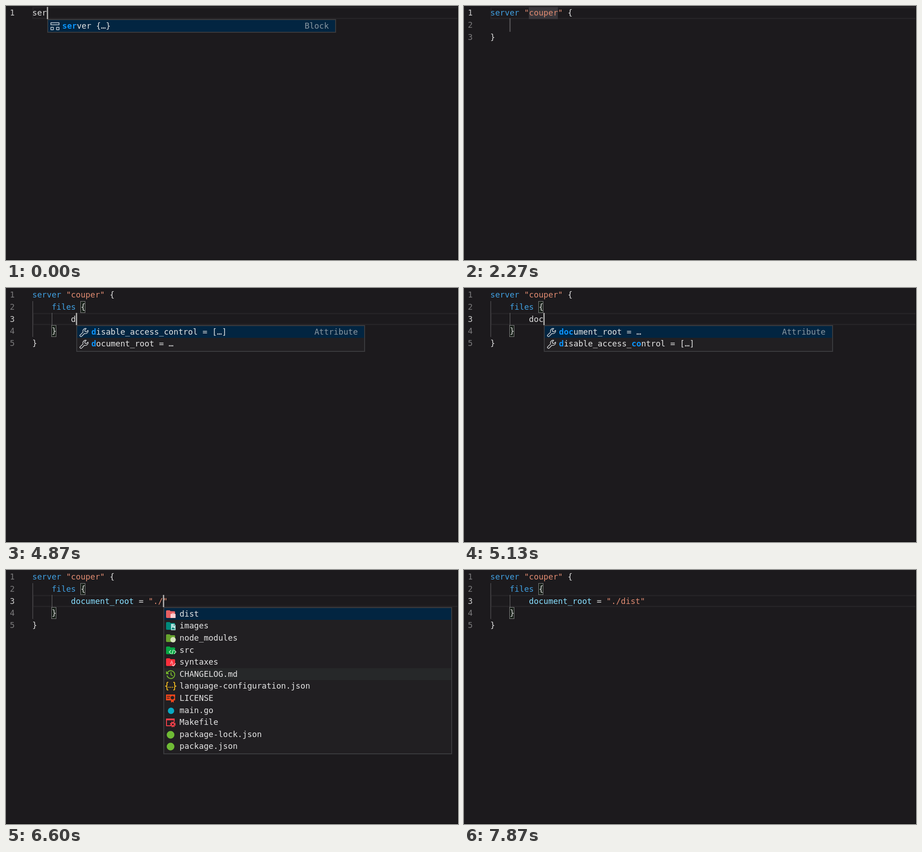
An HTML page for the animation above (8 s loop, 997x561 px).

```html
<!DOCTYPE html>
<html lang="en">
<head>
<meta charset="utf-8">
<title>Editor completion</title>
<style>
  html, body { margin: 0; width: 100%; height: 100%; overflow: hidden; background: #1c1a1d; }
  #stage {
    position: relative; width: 997px; height: 561px; overflow: hidden;
    box-sizing: border-box; border: solid #0a090b; border-width: 0 1px 1px 0;
    font: 17.73px/26.6px "DejaVu Sans Mono", monospace; color: #dedede;
  }
  #stage div, #stage svg { position: absolute; box-sizing: border-box; }
  .text { white-space: pre; }
  .num { color: #7c7b7d; }
  .num.on { color: #cbcbcb; }
  .line { border: 3px solid #252326; border-right: 0; }
  .key { color: #409fe0; }
  .str { color: #e08b71; }
  .attr { color: #88dfff; }
  .brace { border: 1.5px solid #858585; background: rgba(0, 100, 0, .1); }
  .guide { background: #403e41; }
  .guide.on { background: #706f71; }
  .hold { background: #39363a; }
  .stop { background: #4b494c; }
  #cursor { width: 3px; height: 26.6px; background: #a6a6a5; }
  #stage .pop { width: 637.5px; border: 2px solid #3b3b3e; background: #211f22; padding-bottom: 2px; color: #e4e4e4; }
  #stage .row { position: relative; height: 26.6px; padding-left: 31.5px; white-space: pre; }
  #stage .files .row { padding-left: 34px; }
  .row:first-child { background: #022541; }
  .row:only-child { height: 28.6px; margin-bottom: -2px; }
  .files .row:nth-child(6) { background: #262829; }
  .row svg { left: 4px; top: 4px; width: 22px; height: 20px; overflow: visible; }
  .row b { color: #0b93fa; }
  .detail { right: 14px; top: 0; color: #8996a0; }
</style>
</head>
<body>
<div id="stage"><div id="view"></div><div id="cursor"></div></div>
<script>
const LOOP = 8000, BLINK = 535;
const LEFT = 58, TOP = 2, CW = 10.674, LH = 26.6;
const TEXT_DY = .35; // text sits slightly below the line box
const x = col => LEFT + col * CW;
const y = line => TOP + line * LH;

// Icons, drawn in a 22 x 20 box
const line = (d, color, w = 1.5) =>
  `<path d="${d}" fill="none" stroke="${color}" stroke-width="${w}" stroke-linejoin="round"/>`;
const fill = (d, color) => `<path d="${d}" fill="${color}"/>`;
const dot = (cx, cy, r, color) => `<circle cx="${cx}" cy="${cy}" r="${r}" fill="${color}"/>`;
const label = (lx, ly, size, color, text) =>
  `<text x="${lx}" y="${ly}" fill="${color}" style='font:${size}px "Open Sans", sans-serif'>${text}</text>`;
const folder = (color, badge) =>
  fill('M0 3q0-2 2-2h6l2 2h8q2 0 2 2v11q0 2-2 2h-16q-2 0-2-2z', color) + badge;

const icons = {
  block: line('M2 2h18v4.5h-18zM2 12h5.5v5.5h-5.5zM14.5 12h5.5v5.5h-5.5z', '#cfd8df'),
  wrench: line('M20 5.5l-3.6 3.3-3-.8-.7-3 3.3-3.5a6 6 0 0 0-7 8l-6.2 6a2 2 0 0 0 3 3.2l6.3-6.3a6 6 0 0 0 7.9-6.9z', '#d0d3d6'),
  word: label(0, 14, 13.3, '#e4e4e4', 'abc'),
  dist: folder('#e45f62', fill('M10 9h3v-2h5v2h3v9h-11z', '#ffcdd2') + fill('M14 8h3v1h-3z', '#e45f62')),
  images: folder('#00897b', fill('M11 5h7l3 3v11h-10z', '#b2dfdb') + fill('M12 17l3-5 2 3 1-1 2 3zM17 6v3h3z', '#00796b')),
  modules: folder('#67a32e', dot(15.5, 13, 6, '#d5e3bd')),
  src: folder('#08a644', line('M11 9l-4 4 4 4M18 9l4 4-4 4M16 8l-3 10', '#c4f7d2')),
  syntaxes: folder('#f92f3c', label(9, 14, 11, '#ffd0d2', 'A') + line('M13 15l3 3 5-6', '#ffd0d2')),
  history: line('M3 6a8.6 8.6 0 1 1-.8 6M11 5v5.5l4 2.5', '#76b52b', 2) + fill('M0 2v7h7z', '#76b52b'),
  json: line('M5 1h-1q-2 0-2 2v4q0 2.5-3 2.5 3 0 3 2.5v4q0 2 2 2h1M16 1h1q2 0 2 2v4q0 2.5 3 2.5-3 0-3 2.5v4q0 2-2 2h-1', '#e9b41f', 2) +
    [6.5, 10.5, 14.5].map(c => dot(c, 12, 1.2, '#e9b41f')).join(''),
  license: fill('M0 1h20v13h-3v5l-3-2-3 2v-5h-11z', '#f4471c') + line('M2 5h7M2 9h6', '#211f22') +
    fill('M14 3l1.2 2 2.3-.5-.4 2.3 2 1.2-2 1.2.4 2.3-2.3-.5-1.2 2-1.2-2-2.3.5.4-2.3-2-1.2 2-1.2-.4-2.3 2.3.5z', '#211f22'),
  go: dot(11, 10, 7, '#0aa9c2'),
  make: line('M10 17h-9v-15h17v6', '#f4404a', 2) + fill('M0 1h19v4h-19z', '#f4404a') +
    `<circle cx="15" cy="14" r="5" fill="none" stroke="#f4404a" stroke-width="2.5" stroke-dasharray="2.6 1.3"/>` +
    `<circle cx="15" cy="14" r="3.3" fill="none" stroke="#f4404a" stroke-width="2.5"/>`,
  node: dot(10, 10, 8.5, '#6fbb35')
};

// Completion lists: [icon, label], with *matched* letters
const list = (rows, detail = '', kind = '') => ({ rows, detail, kind });
const attrs = (...names) => list(names.map(n => ['wrench', n]), 'Attribute');
const block = name => list([['block', name]], 'Block');
const words = list(['couper', 'document_root', 'files', 'server'].map(w => ['word', w]));
const files = list([
  ['dist', 'dist'], ['images', 'images'], ['modules', 'node_modules'], ['src', 'src'],
  ['syntaxes', 'syntaxes'], ['history', 'CHANGELOG.md'], ['json', 'language-configuration.json'],
  ['license', 'LICENSE'], ['go', 'main.go'], ['make', 'Makefile'],
  ['node', 'package-lock.json'], ['node', 'package.json']
], '', 'files');

const outer = (name, body = '') => `server "${name}" {\n${body}\n}`;
const inner = text => outer('couper', `    files {\n        ${text}\n    }`);
const named = (t, name) => [t, { code: outer(name), cur: [0, 8 + name.length], hold: name.length, pop: null }];
const attr = (t, text, col, pop = null, base = t) => [t, { code: inner(text), cur: [2, col], pop, base }];

// Each step: [time, changes]; base is when the cursor blink restarts
const steps = [
  [0, { code: 'ser', cur: [0, 3], pop: block('*ser*ver {…}'), braces: [], guides: [], hold: -1, base: -270 }],
  named(525, ''),
  named(1125, 'c'),
  named(1265, 'co'),
  named(1395, 'cou'),
  named(1525, 'coup'),
  named(1655, 'coupe'),
  named(1725, 'couper'),
  [2595, { cur: [1, 4], hold: -1, guides: [[0, 1, 1, 1]] }],
  [2660, { braces: [[0, 16], [2, 0]], base: 2595 }],
  [2995, { code: outer('couper', '    f'), cur: [1, 5] }],
  [3060, { pop: block('*f*iles {…}'), base: 3195 }],
  [3665, { code: inner(''), cur: [2, 8], pop: null, braces: [[0, 16], [4, 0]], guides: [[0, 1, 3, 1]], base: 3590 }],
  [3865, { braces: [[1, 10], [3, 4]], guides: [[0, 1, 3, 0], [4, 2, 2, 1]], base: 3590 }],
  attr(4865, 'd', 9, attrs('*d*isable_access_control = […]', '*d*ocument_root = …')),
  attr(4995, 'do', 10, attrs('*do*cument_root = …', '*d*isable_access_c*o*ntrol = […]')),
  attr(5122, 'doc', 11, attrs('*doc*ument_root = …', '*d*isable_access_*co*ntrol = […]')),
  attr(5795, 'document_root = ""', 25, null, 5730),
  attr(5925, 'document_root = ""', 25, words, 5730),
  attr(6395, 'document_root = "."', 26),
  attr(6592, 'document_root = "./"', 27, files),
  attr(6925, 'document_root = "./d"', 28, list([['dist', '*d*ist']], '', 'files')),
  attr(7322, 'document_root = "./dist"', 31)
];

const states = [];
steps.forEach(([t, change], i) => states.push({ ...states[i - 1], base: t, ...change, t }));

const box = (cls, left, top, w, h, html = '') =>
  `<div class="${cls}" style="left:${left}px;top:${top}px;width:${w}px;height:${h}px">${html}</div>`;

const paint = text => text.replace(/"[^"]*"|\b(server|files)\b|\bdocument_root\b/g, (m, key) =>
  `<span class="${m[0] === '"' ? 'str' : key ? 'key' : 'attr'}">${m}</span>`);

function popup({ rows, detail, kind }, [row, col]) {
  const body = rows.map(([icon, name], i) =>
    `<div class="row"><svg viewBox="0 0 22 20">${icons[icon]}</svg>` +
    name.replace(/\*(.+?)\*/g, '<b>$1</b>') +
    (i || !detail ? '' : `<div class="detail">${detail}</div>`) + '</div>').join('');
  return `<div class="pop ${kind}" style="left:${x(col) + .6}px;top:${y(row + 1)}px">${body}</div>`;
}

function draw(s) {
  const [row, col] = s.cur;
  let html = box('line', LEFT, y(row), 945, LH);
  if (s.hold >= 0) {
    html += box('hold', x(8), TOP, s.hold * CW, LH) + box('stop', x(4) - 1, y(1) - 1.5, 3, 30);
  }
  for (const [c, from, to, on] of s.guides) {
    html += box(on ? 'guide on' : 'guide', x(c), y(from), 1.5, (to - from + 1) * LH);
  }
  for (const [r, c] of s.braces) html += box('brace', x(c) - .3, y(r), CW, LH);
  s.code.split('\n').forEach((text, i) => {
    const top = y(i) + TEXT_DY;
    html += box(i === row ? 'num on' : 'num', 8.6, top, 20, LH, i + 1);
    html += box('text', LEFT, top, 930, LH, paint(text));
  });
  if (s.pop) html += popup(s.pop, s.cur);
  view.innerHTML = html;
  cursor.style.left = x(col) + 'px';
  cursor.style.top = y(row) + 'px';
}

const view = document.getElementById('view');
const cursor = document.getElementById('cursor');
let shown;

function tick() {
  const t = performance.now() % LOOP;
  const s = states.findLast(st => st.t <= t);
  if (s !== shown) draw(shown = s);
  const off = t >= s.base && Math.floor((t - s.base) / BLINK) % 2;
  cursor.style.opacity = off ? 0 : 1;
  requestAnimationFrame(tick);
}
tick();
</script>
</body>
</html>
```
